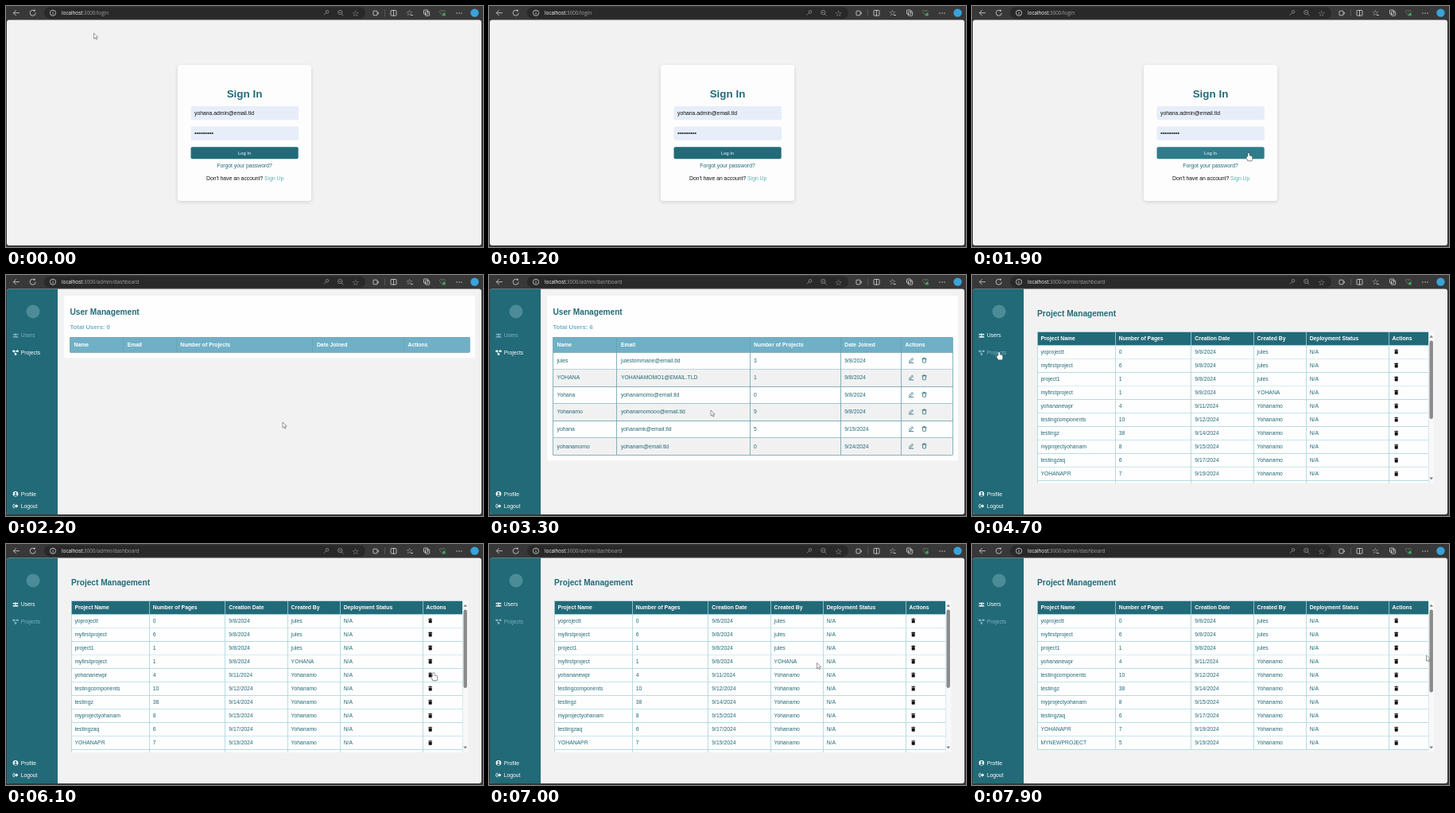
Recreate the animation shown at these times as an HTML page with a canvas. Size 600 px wide and 303 px high, loop 8 s.

```html
<!DOCTYPE html>
<html lang="en">
<head>
<meta charset="utf-8">
<title>Admin dashboard demo</title>
<style>
html, body { margin: 0; width: 100%; height: 100%; overflow: hidden; background: #383838; }
canvas { display: block; width: 600px; height: 303px; }
</style>
</head>
<body>
<canvas id="stage"></canvas>
<script>
const W = 600, H = 303, LOOP = 8000, STEP = 100;
const TEAL = '#226a78', SKY = '#70b0c7', DIM = '#7fb3c0', PAGE = '#f3f2f3', INK = '#d8d8d8', SOFT = '#929292';
const SANS = '"Liberation Sans", Arial, sans-serif';
const UI = '"Open Sans", "Noto Sans", sans-serif';
const GLYPHS = '"DejaVu Sans", sans-serif';
const BODY = 6.8;
const AT = { dashboard: 2200, users: 2300, projects: 4700, removed: 7600 };

const canvas = document.getElementById('stage');
const ctx = canvas.getContext('2d');
const ratio = window.devicePixelRatio || 1;
canvas.width = W * ratio;
canvas.height = H * ratio;

// Pointer moves: start time, end time, destination
const moves = [
  [0, 300, 128, 112], [300, 600, 302, 208], [700, 1000, 604, 190], [1200, 1900, 348, 185],
  [2200, 3300, 279, 170], [3300, 3700, 535, 150], [3900, 4500, 34, 97], [4900, 6100, 538, 162],
  [6500, 6900, 390, 150], [6900, 7300, 534, 147], [7600, 7900, 571.5, 140]
];

const parse = rows => rows.trim().split('\n').map(row => row.trim().split(' '));

const userCols = ['Name', 'Email', 'Number of Projects', 'Date Joined', 'Actions'];
const users = parse(`
  jules julestommane@email.tld 3 9/8/2024
  YOHANA YOHANAMOMO1@EMAIL.TLD 1 9/8/2024
  Yohana yohanamomo@email.tld 0 9/8/2024
  Yohanamo yohanamomooo@email.tld 9 9/8/2024
  yohana yohanamk@email.tld 5 9/19/2024
  yohanamomo yohanam@email.tld 0 9/24/2024`);

const projectCols = ['Project Name', 'Number of Pages', 'Creation Date', 'Created By', 'Deployment Status', 'Actions'];
const projects = parse(`
  yoprojectt 0 9/8/2024 jules N/A
  myfirstproject 6 9/8/2024 jules N/A
  project1 1 9/8/2024 jules N/A
  myfirstproject 1 9/8/2024 YOHANA N/A
  yohananewpr 4 9/11/2024 Yohanamo N/A
  testingcomponents 10 9/12/2024 Yohanamo N/A
  testingz 38 9/14/2024 Yohanamo N/A
  myprojectyohanam 8 9/15/2024 Yohanamo N/A
  testingzaq 6 9/17/2024 Yohanamo N/A
  YOHANAPR 7 9/19/2024 Yohanamo N/A
  MYNEWPROJECT 5 9/19/2024 Yohanamo N/A`);

function rect(x, y, w, h, fill, r = 0) {
  ctx.fillStyle = fill;
  ctx.beginPath();
  ctx.roundRect(x, y, w, h, r);
  ctx.fill();
}

function box(x, y, w, h, color, r = 0.8) {
  ctx.strokeStyle = color;
  ctx.lineWidth = 0.8;
  ctx.beginPath();
  ctx.roundRect(x, y, w, h, r);
  ctx.stroke();
}

function line(x1, y1, x2, y2, color, width = 0.8) {
  ctx.strokeStyle = color;
  ctx.lineWidth = width;
  ctx.beginPath();
  ctx.moveTo(x1, y1);
  ctx.lineTo(x2, y2);
  ctx.stroke();
}

function arc(x, y, r, from = 0, to = Math.PI * 2) {
  ctx.beginPath();
  ctx.arc(x, y, r, from, to);
}

function dot(x, y, r, fill, from, to) {
  ctx.fillStyle = fill;
  arc(x, y, r, from, to);
  ctx.fill();
}

function ring(x, y, r, color, from, to) {
  ctx.strokeStyle = color;
  ctx.lineWidth = 0.8;
  arc(x, y, r, from, to);
  ctx.stroke();
}

// Triangle pointing along dir, with half-width w and height h
function triangle(x, y, w, h, dir, fill) {
  at(x, y, () => {
    ctx.rotate(dir);
    ctx.fillStyle = fill;
    ctx.beginPath();
    ctx.moveTo(h / 2, 0);
    ctx.lineTo(-h / 2, -w);
    ctx.lineTo(-h / 2, w);
    ctx.fill();
  });
}

function setFont(size, bold, family) {
  ctx.font = `${bold ? 'bold ' : ''}${size}px ${family}`;
}

function measure(str, bold = false) {
  setFont(BODY, bold, SANS);
  return ctx.measureText(str).width;
}

function text(str, x, y, color, size = BODY, bold = false, align = 'left', family = SANS) {
  setFont(size, bold, family);
  ctx.fillStyle = color;
  ctx.textAlign = align;
  ctx.fillText(str, x, y);
  return ctx.measureText(str).width;
}

function at(x, y, paint) {
  ctx.save();
  ctx.translate(x, y);
  paint();
  ctx.restore();
}

function glyph(char, x, size, color = INK) {
  text(char, x, 8.8 + size * 0.36, color, size, false, 'center', GLYPHS);
}

function toolbar(path) {
  rect(0, 0, W, H, '#383838');
  rect(48, 1.5, 404, 14.5, '#292929', 7.2);
  line(9.5, 8.7, 17, 8.7, INK);
  for (const side of [-1, 1]) line(9.3, 8.7, 12.8, 8.7 + side * 3.5, INK);
  ring(33.7, 8.7, 3.5, INK, 0, 5.4);
  triangle(36, 6, 1.5, 2, 0.8, INK);
  ring(59, 8.7, 3.6, INK);
  line(59, 8.2, 59, 10.8, INK);
  dot(59, 6.9, 0.5, INK);
  const w = text('localhost', 70, 11, '#fff', 6.3, false, 'left', UI);
  text(':3000' + path, 70 + w, 11, '#a2a2a2', 6.3, false, 'left', UI);

  ring(404, 7.3, 1.8, SOFT);
  line(402.7, 8.6, 399.8, 11.5, SOFT);
  ring(420.3, 8, 2.7, SOFT);
  line(422.2, 10, 424.5, 12.3, SOFT);
  line(419, 8, 421.6, 8, SOFT);
  glyph('☆', 439.7, 10.5, '#b0b0b0');
  box(462, 6.2, 5, 5.6, INK);
  ring(467.4, 9, 1.2, INK, -1.6, 1.6);
  line(476.5, 4.5, 476.5, 13, '#606060');
  box(484, 5.5, 7, 6.6, INK);
  line(487.5, 5, 487.5, 12.6, INK);
  glyph('☆', 507.5, 10, INK);
  line(509, 11.5, 512, 11.5, INK);
  box(525.5, 5, 5.2, 5.2, INK);
  box(527.5, 7, 5.2, 5.2, INK);
  glyph('♡', 549, 9.5);
  dot(551, 10.8, 2, '#35a65a');
  for (let i = -1; i <= 1; i++) dot(570 + i * 3, 9, 0.65, INK);
  dot(589.5, 8.6, 5.2, '#39a3da');
}

function login(pointer) {
  ctx.save();
  ctx.shadowColor = 'rgba(0,0,0,.13)';
  ctx.shadowBlur = 5 * ratio;
  ctx.shadowOffsetY = 1.5 * ratio;
  rect(216, 74, 168, 171, '#fdfdfe', 3.5);
  ctx.restore();
  text('Sign In', 300, 114.5, TEAL, 13.4, true, 'center');
  for (const y of [126, 151.5]) rect(232.5, y, 135.5, 17.3, '#e7eef9', 2);
  text('yohana.admin@email.tld', 237, 136.8, '#111');
  for (let i = 0; i < 10; i++) dot(238.3 + i * 2.38, 160, 0.95, '#111');
  rect(232.5, 177.3, 135.2, 15, inLogin(pointer) ? '#2f7c8b' : TEAL, 2);
  text('Log In', 300, 186.8, '#fff', 5.7, false, 'center');
  text('Forgot your password?', 300, 202.5, TEAL, BODY, false, 'center');
  const w = text("Don't have an account? ", 252, 219, '#111');
  text('Sign Up', 252 + w, 219, '#5fb0b3');
}

function usersIcon(c) {
  for (let i = -1; i <= 1; i++) {
    dot(12 + i * 2.4, 74.8, i ? 1 : 1.4, c);
    dot(12 + i * 2.2, 78.4, i ? 1.5 : 2, c, Math.PI, 0);
  }
}

function projectsIcon(c) {
  line(9.5, 95.8, 14.4, 95.8, c);
  line(10, 96, 12, 99.5, c);
  for (let i = 0; i < 3; i++) rect(8.4 + i * 2.4, i === 1 ? 98.3 : 94.6, 2.5, 2.5, c, 0.4);
}

function sidebar(usersColor, projectsColor) {
  rect(1, 17.5, 64, 283.5, TEAL, [3, 0, 0, 3]);
  dot(34, 46, 8.5, '#4b8c98');
  usersIcon(usersColor);
  text('Users', 18.7, 78.3, usersColor);
  projectsIcon(projectsColor);
  text('Projects', 18.7, 100, projectsColor);
  dot(12, 275.2, 3.3, '#fff');
  dot(12, 274.2, 1.2, TEAL);
  dot(12, 277.7, 1.9, TEAL, Math.PI, 0);
  text('Profile', 18.7, 277.8, '#fff');
  ring(11, 290.5, 2.4, '#fff', Math.PI / 2, -Math.PI / 2);
  rect(10.5, 289.7, 2.5, 1.6, '#fff');
  triangle(14, 290.5, 2.5, 2.8, 0, '#fff');
  text('Logout', 18.7, 292.8, '#fff');
}

function editIcon(x, y) {
  line(x - 3, y + 3.2, x + 3.2, y + 3.2, TEAL);
  at(x, y, () => {
    ctx.rotate(-0.8);
    box(-2.8, -0.9, 5.6, 1.8, TEAL, 0.5);
  });
}

function binOutline(x, y) {
  line(x - 3, y - 2, x + 3, y - 2, TEAL);
  line(x - 1, y - 3, x + 1, y - 3, TEAL);
  box(x - 2, y - 2, 4, 5, TEAL);
}

function binSolid(x, y) {
  rect(x - 2.4, y - 2.4, 4.8, 0.9, '#111');
  rect(x - 0.9, y - 3, 1.8, 0.8, '#111');
  rect(x - 2, y - 1.2, 4, 4.2, '#111', 0.6);
}

// Column edges, sharing the width in proportion to the widest cell
function columns(left, right, pad, heads, rows, lastMin = 0) {
  const need = heads.map((head, i) => 2 * pad + Math.max(
    measure(head, true),
    i === heads.length - 1 ? lastMin : 0,
    ...rows.map(row => measure(row[i] || ''))
  ));
  const scale = (right - left) / need.reduce((a, b) => a + b);
  const xs = [left];
  need.forEach((n, i) => xs.push(xs[i] + n * scale));
  return xs;
}

function table({ xs, top, head, rowH, pad, heads, rows, bar, edge, stripe, actions }) {
  const left = xs[0], right = xs[xs.length - 1], end = head + rows.length * rowH;
  const snap = v => Math.floor(v) + 0.5;
  const rule = y => line(left, snap(y), right, snap(y), edge);
  rect(left, top, right - left, end - top, '#fefefe');
  rows.forEach((row, r) => {
    const y = head + r * rowH, mid = y + rowH / 2;
    if (r % 2) rect(left, y, right - left, rowH, stripe);
    row.forEach((cell, i) => text(cell, xs[i] + pad, mid + 2, TEAL));
    actions(mid - 0.6);
    rule(y + rowH);
  });
  rect(left, top, right - left, head - top, bar);
  heads.forEach((h, i) => text(h, xs[i] + pad, (top + head) / 2 + 2.2, '#fff', BODY, true));
  rule(top);
  rule(head);
  xs.forEach(x => line(snap(x), top, snap(x), end, edge));
}

function usersPage(loaded) {
  const rows = loaded ? users : [];
  const head = 97, rowH = 21.55;
  rect(73, 26, 517, head + rows.length * rowH - 18.7, '#fefefe', 3);
  text('User Management', 80.5, 50.3, TEAL, 10.15, true);
  text('Total Users: ' + rows.length, 80.5, 68.3, SKY, 7.7, true);
  table({
    xs: columns(80.5, 583, 5, userCols, rows, loaded ? 31 : 0),
    top: 78.5, head, rowH, pad: 5, heads: userCols, rows,
    bar: SKY, edge: '#6a9fac', stripe: '#f1f1f1',
    actions: y => { editIcon(531, y); binOutline(547.5, y); }
  });
}

function projectsPage(removed) {
  const top = 71.5, bottom = 262;
  const rows = projects.filter((_, i) => !(removed && i === 3));
  text('Project Management', 82, 52, TEAL, 10.15, true);
  ctx.save();
  ctx.beginPath();
  ctx.rect(81.5, top, 500, bottom - top);
  ctx.clip();
  table({
    xs: columns(82, 574, 4.4, projectCols, projects),
    top, head: 88.4, rowH: 17.05, pad: 4.4, heads: projectCols, rows,
    bar: TEAL, edge: '#a5d3df', stripe: '#fefefe',
    actions: y => binSolid(533.7, y)
  });
  rect(574.5, top, 7, bottom - top, '#f8f8f8');
  triangle(577.7, 77.2, 2.3, 3, -Math.PI / 2, '#808080');
  triangle(577.7, 256, 2.3, 3, Math.PI / 2, '#808080');
  rect(575.5, 82.5, 4.4, removed ? 104 : 98.5, '#8a8a8a', 2.2);
  ctx.restore();
}

function pointerAt(t) {
  let x = 110.5, y = 34;
  for (const [start, end, toX, toY] of moves) {
    const k = Math.min(1, Math.max(0, (t - start) / (end - start)));
    const ease = k * k * (3 - 2 * k);
    x += (toX - x) * ease;
    y += (toY - y) * ease;
  }
  return { x, y };
}

const inLogin = p => p.x > 232 && p.x < 368 && p.y > 177 && p.y < 192;
const inProjectsLink = p => p.x > 8 && p.x < 46 && p.y > 92 && p.y < 103;

function isHand(t, p) {
  if (t < AT.dashboard) return inLogin(p);
  if (inProjectsLink(p)) return true;
  if (t < AT.projects) return t >= AT.users && p.x > 526 && p.x < 552 && p.y > 97;
  return p.x > 530 && p.x < 539 && p.y > 89;
}

function arrow() {
  ctx.beginPath();
  ctx.moveTo(0, 0);
  ctx.lineTo(0, 7.2);
  ctx.lineTo(1.7, 5.7);
  ctx.lineTo(2.9, 8.2);
  ctx.lineTo(4, 7.7);
  ctx.lineTo(2.9, 5.2);
  ctx.lineTo(5.1, 5.1);
  ctx.closePath();
  ctx.fill();
  ctx.stroke();
}

// Finger, thumb and palm outlined first, then filled as one shape
function hand() {
  ctx.beginPath();
  ctx.roundRect(-0.8, 0, 1.7, 7, 0.8);
  ctx.roundRect(-2.7, 4.8, 2, 2.6, 0.9);
  ctx.roundRect(-1.6, 3.6, 6, 6, 1.6);
  ctx.lineWidth = 1.2;
  ctx.stroke();
  ctx.fill();
}

function draw(t) {
  const pointer = pointerAt(t);
  const onProjects = t >= AT.projects;
  ctx.setTransform(ratio, 0, 0, ratio, 0, 0);
  toolbar(t < AT.dashboard ? '/login' : '/admin/dashboard');
  rect(1, 17.5, 597, 283.5, PAGE, 3);
  if (t < AT.dashboard) {
    login(pointer);
  } else {
    sidebar(onProjects ? '#fff' : DIM, onProjects || inProjectsLink(pointer) ? DIM : '#fff');
    if (onProjects) projectsPage(t >= AT.removed);
    else usersPage(t >= AT.users);
  }
  at(pointer.x, pointer.y, () => {
    ctx.lineJoin = 'round';
    ctx.lineWidth = 0.6;
    ctx.fillStyle = '#fff';
    ctx.strokeStyle = '#555';
    isHand(t, pointer) ? hand() : arrow();
  });
}

function tick() {
  draw(Math.floor(performance.now() % LOOP / STEP) * STEP);
  requestAnimationFrame(tick);
}
tick();
</script>
</body>
</html>
```
